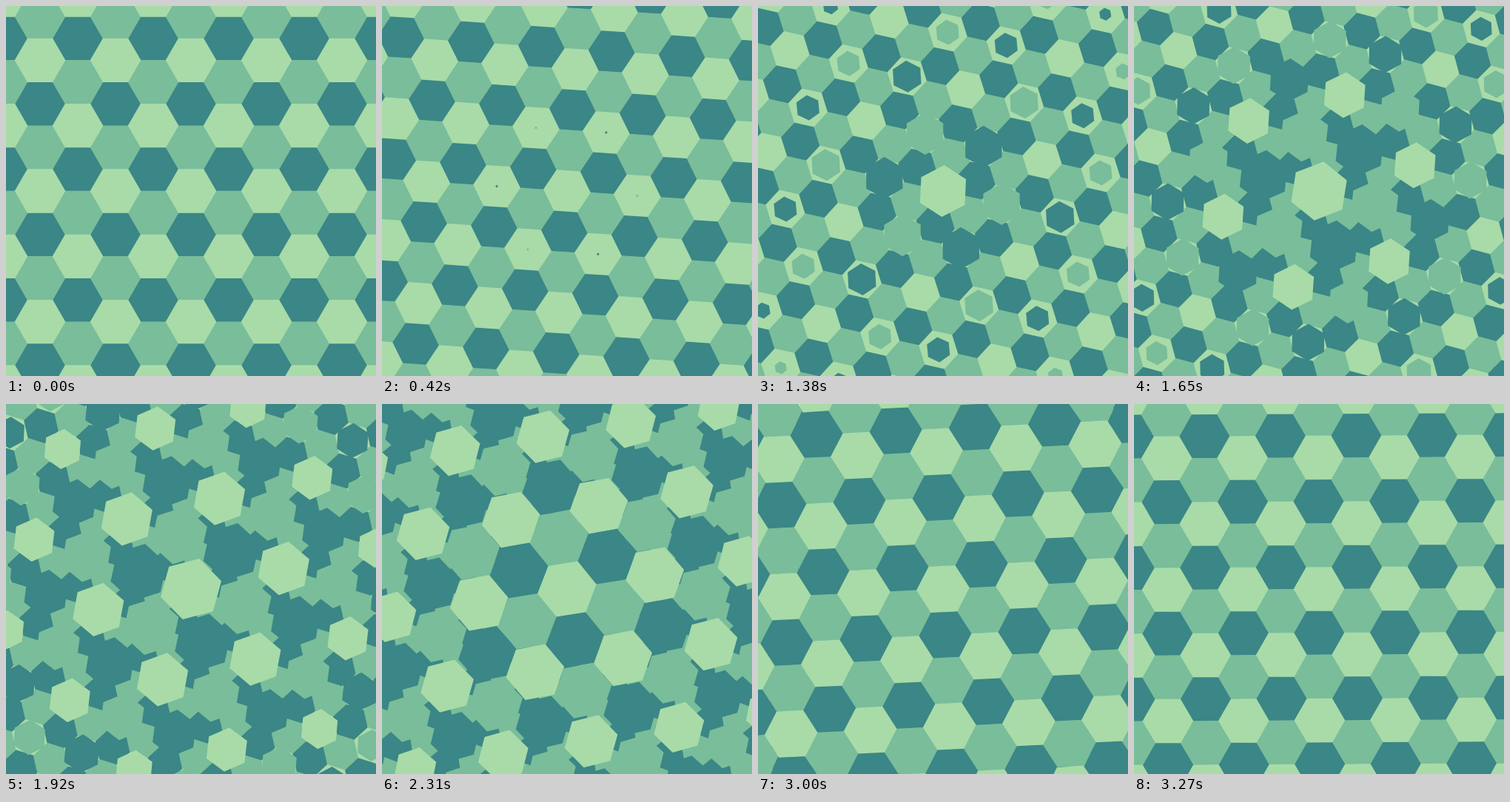
Recreate the animation shown at these times as an HTML page with a canvas. Size 500 px wide and 500 px high, loop 3.3 s.

```html
<!DOCTYPE html>
<html lang="en">
<head>
<meta charset="utf-8">
<title>Hexagon tiling</title>
<style>
  html, body { margin: 0; width: 100%; height: 100%; overflow: hidden; background: #79bd9a; }
  canvas { display: block; width: 100vw; height: 100vh; }
</style>
</head>
<body>
<canvas id="stage" width="500" height="500"></canvas>
<script>
  const ctx = document.getElementById('stage').getContext('2d');
  const COLORS = ['#a8dba8', '#79bd9a', '#3b8686'];
  const LOOP = 3300, STEP = 30;
  const GROW = 2062;        // ms a tile takes to grow
  const DELAY = 2;          // ms of delay per unit from the centre
  const R = 34, BIG = R * Math.sqrt(3);
  const REACH = 680;

  const ease = u => u * u * (3 - 2 * u);
  const clamp = u => Math.max(0, Math.min(1, u));
  const rad = deg => deg * Math.PI / 180;

  // Three-coloured triangular lattice; neighbours sit at turn and turn + 60 degrees.
  function lattice(pitch, turn) {
    const cells = [], n = Math.ceil(REACH / pitch * 1.2);
    const a = rad(turn), b = rad(turn + 60);
    for (let i = -n; i <= n; i++) {
      for (let j = -n; j <= n; j++) {
        const x = pitch * (i * Math.cos(a) + j * Math.cos(b));
        const y = pitch * (i * Math.sin(a) + j * Math.sin(b));
        const dist = Math.hypot(x, y);
        if (dist < REACH) cells.push({ x, y, dist, kind: (((i - j) % 3) + 3) % 3 });
      }
    }
    return cells.sort((p, q) => q.kind - p.kind);   // light tiles on top
  }

  const floor = lattice(BIG, 30);
  const sprouts = lattice(3 * R, 0);

  function hex(cell, r, turn) {
    ctx.beginPath();
    for (let k = 0; k < 6; k++) {
      const a = rad(turn + 60 * k);
      ctx.lineTo(cell.x + r * Math.cos(a), cell.y + r * Math.sin(a));
    }
    ctx.fillStyle = COLORS[cell.kind];
    ctx.fill();
  }

  function draw(t) {
    const p = t / LOOP, zoom = Math.pow(3, -p / 2);
    ctx.setTransform(1, 0, 0, 1, 0, 0);
    ctx.fillStyle = COLORS[1];
    ctx.fillRect(0, 0, 500, 500);
    ctx.translate(250, 250);
    ctx.rotate(rad(30 * p));
    ctx.scale(zoom, zoom);

    for (const c of floor) hex(c, R + 0.3, 0);
    for (const c of sprouts) {
      const u = clamp((t - DELAY * c.dist) / GROW);
      if (u > 0) hex(c, BIG * ease(u) + 0.3 * u, 30 * u);
    }
  }

  const start = performance.now();
  function tick() {
    const t = (performance.now() - start) % LOOP;
    draw(Math.floor(t / STEP) * STEP);
    requestAnimationFrame(tick);
  }
  tick();
</script>
</body>
</html>
```
